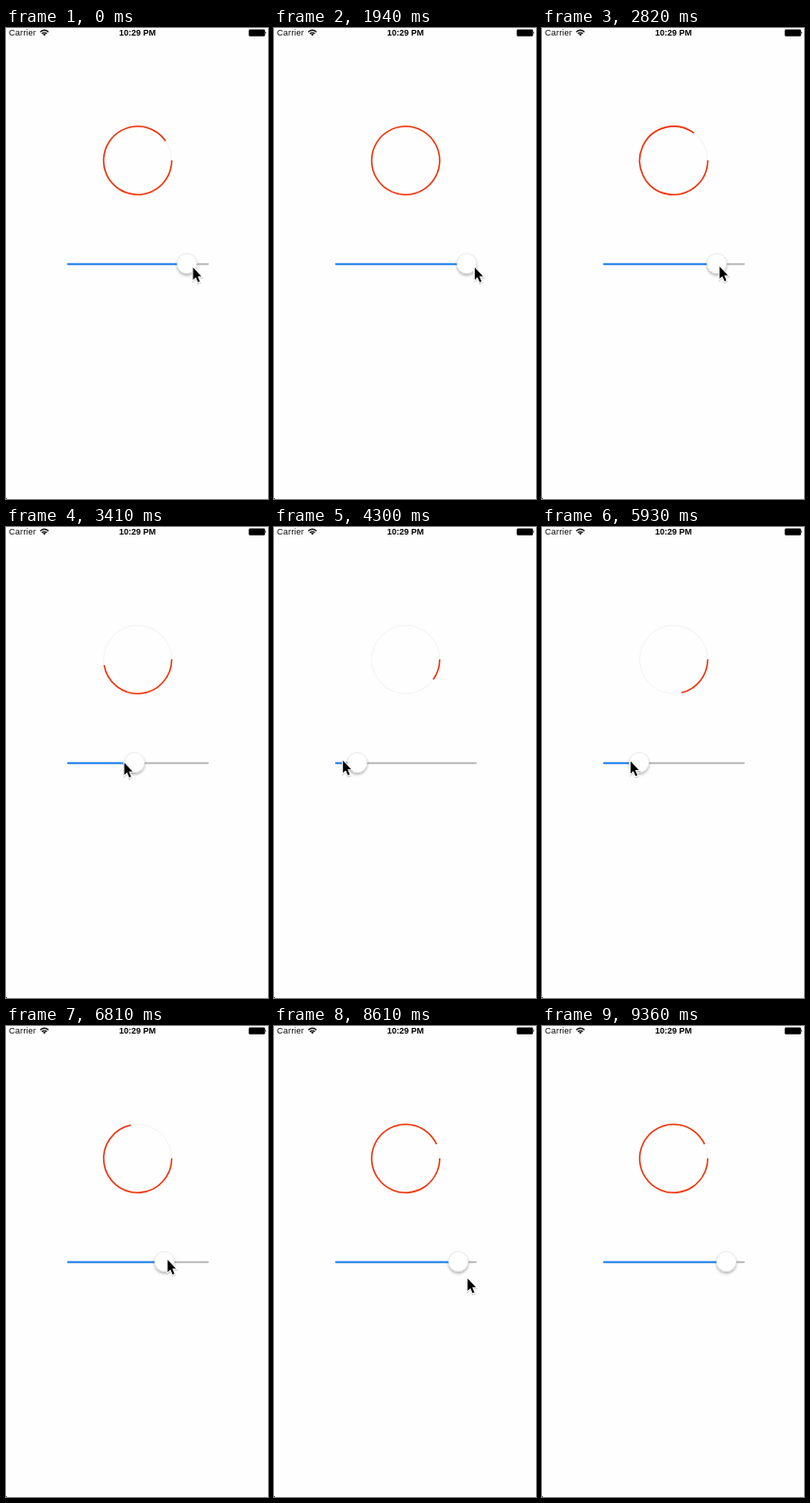
Recreate the animation shown at these times as an HTML page. Size 278 px wide and 498 px high, loop 9.78 s.

```html
<!DOCTYPE html>
<html lang="en">
<head>
<meta charset="utf-8">
<title>Progress ring and slider</title>
<style>
  html, body { margin: 0; width: 100%; height: 100%; overflow: hidden; background: #fefefe; }
  svg { display: block; width: 100vw; height: 100vh; }
  text { font: 9.2px "Liberation Sans", Arial, sans-serif; fill: #111; }
  .time { font-size: 9px; font-weight: bold; text-anchor: middle; fill: #000; }
  .line { fill: none; stroke-width: 1.6; }
</style>
</head>
<body>
<svg viewBox="0 0 278 498">
  <defs>
    <filter id="soft" x="-50%" y="-50%" width="200%" height="200%">
      <feDropShadow dx="0" dy="2" stdDeviation="1.6" flood-color="#000" flood-opacity=".3"/>
    </filter>
    <filter id="faint" x="-50%" y="-50%" width="200%" height="200%">
      <feDropShadow dx="0" dy=".7" stdDeviation=".7" flood-color="#000" flood-opacity=".4"/>
    </filter>
  </defs>

  <text x="3.1" y="8.3" letter-spacing=".1">Carrier</text>
  <g fill="none" stroke="#111" stroke-width="1.3">
    <path d="M36.3 4.2Q40.7 .4 45.1 4.2"/>
    <path d="M38 6Q40.7 3.7 43.4 6"/>
    <path d="M39 6.6L40.7 8.5L42.4 6.6Q40.7 5.4 39 6.6Z" fill="#111" stroke="none"/>
  </g>
  <text class="time" x="139.4" y="8.3">10:29 PM</text>
  <rect x="257.6" y="1.4" width="17.2" height="7.4" rx="1.3"/>
  <path d="M275.3 3.6q1.8 1.5 0 3z"/>
  <rect y="497" width="1" height="1" fill="#555"/>

  <circle cx="139.7" cy="140.1" r="36.1" fill="none" stroke="#f2f2f2" stroke-width=".9"/>
  <path id="arc" class="line" stroke="#f0330a"/>

  <path class="line" d="M65.6 249.6H214.4" stroke="#b0b0b0" stroke-linecap="round"/>
  <path id="fill" class="line" stroke="#0a7cf5" stroke-linecap="round"/>
  <circle id="thumb" cy="249" r="10.5" fill="#fff" stroke="#d9d9d9" stroke-width=".5" filter="url(#soft)"/>

  <path id="cursor" d="M1 1.3V14.2L3.9 11.5L6.3 16.8L8.2 16L5.9 10.6H9.8Z"
        stroke="#fff" stroke-width="2" paint-order="stroke" filter="url(#faint)"/>
</svg>
<script>
const LOOP = 9780, FRAMES = 66;

const linear = t => t;
const easeIn = t => t ** 1.5;
const easeOut = t => 1 - (1 - t) ** 1.8;

const rest = { x: 197.5, y: 252, value: .903 };
const drags = [
  { from: 0, to: 3, x: 204, value: .957, ease: linear },
  { from: 5, to: 7, x: 207, value: .978, ease: linear },
  { from: 10, to: 11, x: 210, value: .993, ease: linear },
  { from: 12, to: 13, x: 212, value: 1, ease: linear },
  { from: 16, to: 23, x: 124.5, y: 248, value: .473, ease: easeIn },
  { from: 23, to: 34, x: 55.5, y: 245, value: -.02, ease: easeOut },
  { from: 36, to: 40, x: 93, y: 246.5, value: .213, ease: easeIn },
  { from: 40, to: 46, x: 170.5, y: 246, value: .718, ease: linear },
  { from: 46, to: 50, x: 200, y: 247.5, value: .931, ease: easeOut },
  { from: 57, to: 63, x: 265, y: 515, ease: easeIn }
];

function poseAt(frame) {
  const pose = { ...rest };
  for (const { from, to, ease, ...goal } of drags) {
    if (frame <= from) break;
    const k = ease(Math.min(1, (frame - from) / (to - from)));
    for (const key in goal) pose[key] += (goal[key] - pose[key]) * k;
  }
  return pose;
}

const [arc, fill, thumb, cursor] =
  ["arc", "fill", "thumb", "cursor"].map(id => document.getElementById(id));

function arcPath(value) {
  if (value <= 0) return "";
  const cx = 139.7, cy = 140.1, r = 36.1;
  const angle = Math.min(value, .9999) * 2 * Math.PI;
  const x = cx + r * Math.cos(angle), y = cy + r * Math.sin(angle);
  return `M${cx + r} ${cy}A${r} ${r} 0 ${value > .5 ? 1 : 0} 1 ${x} ${y}`;
}

function show({ x, y, value }) {
  const level = Math.max(0, value);
  const thumbX = 75.5 + 129 * level;
  arc.setAttribute("d", arcPath(level));
  fill.setAttribute("d", `M65.6 249.6H${thumbX}`);
  thumb.setAttribute("cx", thumbX);
  cursor.setAttribute("transform", `translate(${x} ${y})`);
}

const origin = performance.now();
function tick(now) {
  // A small lead absorbs the rounding of the tick times
  const time = (Math.max(0, now - origin) + 10) % LOOP;
  show(poseAt(Math.floor(time / LOOP * FRAMES)));
  requestAnimationFrame(tick);
}
tick(origin);
</script>
</body>
</html>
```
